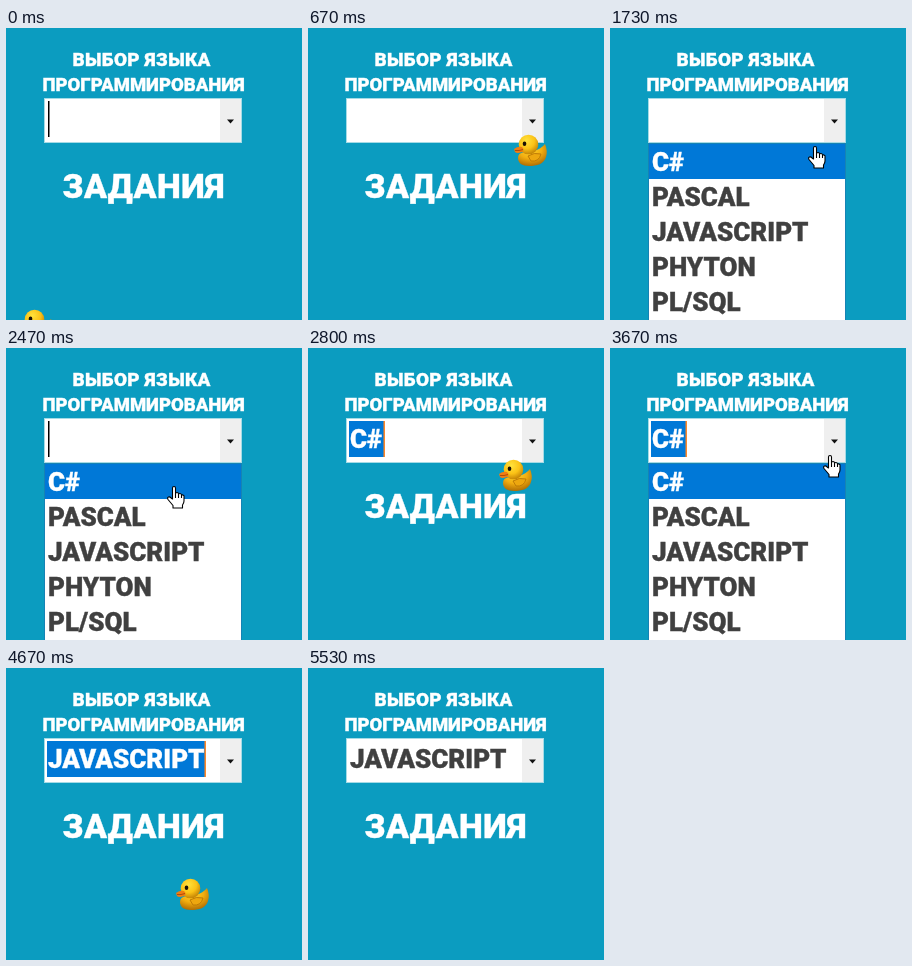
Recreate the animation shown at these times as an HTML page. Size 296 by 292 pixels, loop 5.59 s.

```html
<!DOCTYPE html>
<html lang="ru">
<head>
<meta charset="utf-8">
<style>
  html, body { margin: 0; width: 100%; height: 100%; overflow: hidden; background: #0b9cc0; }
  svg { display: block; width: 296px; height: 292px; }
  text {
    font-family: Roboto, "Liberation Sans", sans-serif; font-weight: 900;
    fill: currentColor; stroke: currentColor; stroke-width: .4px;
  }
  .title { color: #fff; text-anchor: middle; }
  .item { font-size: 26px; color: #404040; }
</style>
</head>
<body>
<svg viewBox="0 0 296 292">
  <defs>
    <radialGradient id="head" cx=".4" cy=".3" r=".75">
      <stop offset="0" stop-color="#ffe23c"/>
      <stop offset=".55" stop-color="#fbc216"/>
      <stop offset="1" stop-color="#bd7c04"/>
    </radialGradient>
    <radialGradient id="body" cx=".42" cy=".25" r=".8">
      <stop offset="0" stop-color="#ffd62e"/>
      <stop offset=".5" stop-color="#f2ae10"/>
      <stop offset="1" stop-color="#a86603"/>
    </radialGradient>
  </defs>
  <rect width="296" height="292" fill="#0b9cc0"/>
  <text class="title" x="135.6" y="38" font-size="18.9" letter-spacing=".3">ВЫБОР ЯЗЫКА</text>
  <text class="title" x="137.6" y="63" font-size="18.5">ПРОГРАММИРОВАНИЯ</text>
  <text class="title" x="137.6" y="170" font-size="33.8" letter-spacing=".4">ЗАДАНИЯ</text>

  <rect x="38.5" y="70.5" width="197" height="44" fill="#fff" stroke="#a5dbe6"/>
  <rect x="214" y="71" width="21" height="43" fill="#efefef"/>
  <path d="M221 91.5h7l-3.5 4z" fill="#111"/>
  <rect id="selection" x="41" y="73" height="36" fill="#0078d7"/>
  <text id="value" class="item" x="42" y="100"></text>
  <rect id="caret" y="73" width="1.5" height="36"/>

  <g id="list">
    <rect x="38.5" y="115.5" width="197" height="190" fill="#fff" stroke="#1683b4"/>
    <rect id="highlight" x="39" width="196" height="35" fill="#0078d7"/>
  </g>

  <g id="duck">
    <path d="M5 24C5 17 14 18 21 17Q28 15 32 10Q35 17 33 23C31 30 24 32 16 32C9 32 5 29 5 24Z" fill="url(#body)"/>
    <path d="M15 22Q21 18 28 20Q26 28 18 27Z" fill="#eda70f" stroke="#b97705" stroke-width=".9"/>
    <circle cx="15.5" cy="10.5" r="9.8" fill="url(#head)"/>
    <path d="M1 15Q5 12 9 13Q12 16 9 18Q4 20 2 18Z" fill="#ef7d12"/>
    <path d="M2 16.5Q6 17 10 15.5" fill="none" stroke="#a9450a" stroke-width=".9"/>
    <ellipse cx="11.5" cy="9.8" rx="1.8" ry="2.2" fill="#1c1204"/>
  </g>
  <path id="hand" fill="#fff" stroke="#000" stroke-width="1.1" stroke-linejoin="round"
    d="M-1.5 13V2Q-1.5 .5 0 .5T1.5 2V8Q1.5 6.5 3 6.5T4.5 8V9Q4.5 7.3 6 7.5T7.5 9V10Q7.5 8.5 9 9T10 11V15Q10 17 8.5 19V22H-1V19.5L-6 13.5Q-7 11.5 -5.5 11T-3 12Z M1.5 8V12M4.5 9V12M7.5 10V12"/>
</svg>
<script>
const LOOP = 5590, STEP = 200 / 3, ROW = 35, LIST_TOP = 116;
const languages = ["C#", "PASCAL", "JAVASCRIPT", "PHYTON", "PL/SQL"];
const selectionWidth = { 0: 35, 2: 158 };
const opened = [1000, 3200], chosen = [2600, 4467], blurred = 5460;

// Pointer hotspot: time, x, y
const route = [
  [0, 15, 297], [800, 222, 108], [1200, 221, 109], [1500, 221, 109],
  [2150, 168, 138], [2600, 168, 138], [2800, 192, 127], [3050, 221, 107],
  [3670, 220, 107], [4250, 176, 203], [4467, 174, 207], [4667, 171, 226], [5250, 75, 310], [LOOP, 40, 330]
];

const $ = id => document.getElementById(id);
const show = (el, on) => el.setAttribute("visibility", on ? "inherit" : "hidden");
const set = (el, attrs) => { for (const k in attrs) el.setAttribute(k, attrs[k]); };

const labels = languages.map((name, i) => {
  const label = document.createElementNS("http://www.w3.org/2000/svg", "text");
  set(label, { class: "item", x: 42, y: 143 + i * ROW });
  label.textContent = name;
  $("list").append(label);
  return label;
});

function pointerAt(t) {
  const i = Math.max(1, route.findIndex(p => p[0] >= t));
  const [t0, x0, y0] = route[i - 1], [t1, x1, y1] = route[i];
  const u = (t - t0) / (t1 - t0), e = u * u * (3 - 2 * u);
  return [x0 + (x1 - x0) * e, y0 + (y1 - y0) * e];
}

function draw(t) {
  const [x, y] = pointerAt(t);
  const open = opened.some((start, i) => t >= start && t < chosen[i]);
  const value = t < chosen[0] ? -1 : t < chosen[1] ? 0 : 2;
  const focused = t < blurred;
  const selected = value >= 0 && focused;

  $("value").textContent = value < 0 ? "" : languages[value];
  $("value").style.color = selected ? "#fff" : "";
  show($("selection"), selected);
  if (selected) set($("selection"), { width: selectionWidth[value] });

  const blinkStart = value < 0 ? 0 : value === 2 ? chosen[1] : t < opened[1] ? chosen[0] : opened[1];
  show($("caret"), focused && Math.floor((t - blinkStart) / 530) % 2 === 0);
  set($("caret"), selected
    ? { x: 40.5 + selectionWidth[value], fill: "#ff8728" }
    : { x: 42, fill: "#000" });

  const overList = open && y >= LIST_TOP;
  const active = overList ? Math.floor((y - LIST_TOP) / ROW) : value;
  show($("list"), open);
  show($("highlight"), open && active >= 0);
  set($("highlight"), { y: LIST_TOP + Math.max(0, active) * ROW });
  labels.forEach((label, i) => label.style.color = i === active ? "#fff" : "");

  const overBox = x >= 38 && x < 236 && y >= 70 && y < 116;
  const hand = overBox || overList;
  show($("hand"), hand);
  show($("duck"), !hand);
  set($("hand"), { transform: `translate(${Math.round(x)} ${Math.round(y)})` });
  set($("duck"), { transform: `translate(${Math.round(x - 2)} ${Math.round(y - 16)})` });
}

const start = performance.now();
function tick(now) {
  const t = Math.max(0, now - start) % LOOP;
  draw(Math.floor((t + 4) / STEP) * STEP);
  requestAnimationFrame(tick);
}
draw(0);
requestAnimationFrame(tick);
</script>
</body>
</html>
```
